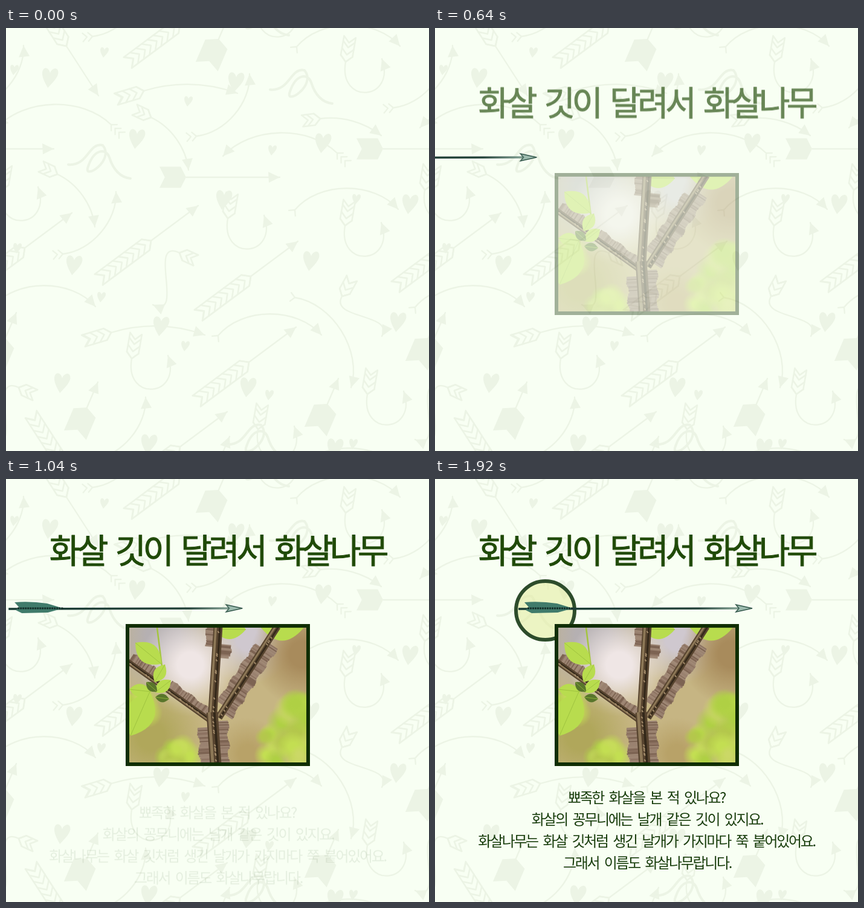
An HTML page with a canvas for the animation above (3.92 s loop, 700 by 700 pixels).

```html
<!DOCTYPE html>
<html lang="ko">
<head>
<meta charset="utf-8">
<title>화살나무</title>
<style>
html, body { margin: 0; width: 100%; height: 100%; overflow: hidden; background: #f8fff3; }
canvas, svg { position: absolute; left: 0; top: 0; width: 700px; height: 700px; }

text {
  font-family: "Noto Sans CJK KR", "Noto Sans CJK", "Noto Sans KR", sans-serif;
  text-anchor: middle; stroke-linejoin: round;
}
#title { font-size: 56px; letter-spacing: -5.5px; word-spacing: 6.5px; fill: #204a08; stroke: #204a08; stroke-width: 1; }
#story { font-size: 24px; letter-spacing: -2.35px; word-spacing: 4.2px; fill: #183c0c; }

/* One step per 80 ms inside each moving stretch. */
#title, #story, #photo, #arrow, #ring { animation: 3920ms infinite; }
#title { animation-name: title; }
#arrow { animation-name: arrow; }
#photo { animation-name: photo; }
#story { animation-name: story; }
#ring { animation-name: ring; }
@keyframes title {
  0% { opacity: 0; transform: translateY(16px); animation-timing-function: steps(12); }
  24.489%, 100% { opacity: 1; transform: none; }
}
@keyframes arrow {
  0% { transform: translateX(-535px); animation-timing-function: step-end; }
  8.163% { transform: translateX(-535px); animation-timing-function: steps(12); }
  32.653%, 100% { transform: translateX(0); }
}
@keyframes photo {
  0% { opacity: 0; animation-timing-function: step-end; }
  10.204% { opacity: 0; animation-timing-function: steps(8); }
  26.53%, 100% { opacity: 1; }
}
@keyframes story {
  0% { opacity: 0; transform: translateY(27px); animation-timing-function: step-end; }
  24.489% { opacity: 0; transform: translateY(27px); animation-timing-function: steps(12); }
  48.979%, 100% { opacity: 1; transform: none; }
}
@keyframes ring {
  0% { opacity: 0; animation-timing-function: step-end; }
  32.653% { opacity: 0; animation-timing-function: steps(8); }
  48.979%, 100% { opacity: 1; }
}
</style>
</head>
<body>
<canvas id="pattern" width="700" height="700"></canvas>

<svg viewBox="0 0 700 700">
  <linearGradient id="shaft" gradientUnits="userSpaceOnUse" x1="140" x2="510" y1="0" y2="0">
    <stop stop-color="#183a33"/><stop offset=".8" stop-color="#28463e"/><stop offset="1" stop-color="#8fae9f"/>
  </linearGradient>
  <circle id="ring" cx="182.5" cy="217.5" r="48.5" fill="#e4eda0" fill-opacity=".58" stroke="#2d4c2b" stroke-width="6"/>
  <g id="arrow">
    <path d="M138 215L505 214" stroke="url(#shaft)" stroke-width="3.6"/>
    <path d="M148 204Q175 202 202 206L228 214 203 221 160 222 150 217 155 212Z" fill="#407b6b"/>
    <path d="M153 214H228" stroke="#132d28" stroke-width="3" stroke-dasharray="3 1"/>
    <path d="M525 214L498 208 503 214 498 220Z" fill="#9dbcaf" stroke="#35594d" stroke-width="1.5"/>
  </g>
</svg>

<canvas id="photo" width="700" height="700"></canvas>

<svg viewBox="0 0 700 700">
  <text id="title" x="350" y="139">화살 깃이 달려서 화살나무</text>
  <g id="story">
    <text x="350" y="536">뾰족한 화살을 본 적 있나요?</text>
    <text x="351" y="572">화살의 꽁무니에는 날개 같은 깃이 있지요.</text>
    <text x="350" y="608">화살나무는 화살 깃처럼 생긴 날개가 가지마다 쭉 붙어있어요.</text>
    <text x="351" y="644">그래서 이름도 화살나무랍니다.</text>
  </g>
</svg>

<script>
const SIZE = 700;
let seed = 11;
const random = () => (seed = seed * 16807 % 2147483647) / 2147483647;
const context = id => document.getElementById(id).getContext('2d');

function drawPattern() {
  const g = context('pattern');
  g.fillStyle = g.strokeStyle = '#ecf4e5';
  g.lineCap = g.lineJoin = 'round';

  function at(x, y, angle, draw) {
    g.save();
    g.translate(x, y);
    g.rotate(angle);
    draw();
    g.restore();
  }

  function polyline(...points) {
    g.beginPath();
    points.forEach(([x, y]) => g.lineTo(x, y));
  }

  // Tails point backwards from the origin.
  const tails = {
    feather(size) {
      const half = 9 + size / 50;
      g.lineWidth = 2.6;
      polyline([0, 0], [-half, -half], [-size, -half], [half - size, 0], [-size, half], [-half, half]);
      g.closePath();
      g.stroke();
      for (let x = 0; x > half - size; x -= 12) {
        polyline([x - half, -half], [x, 0], [x - half, half]);
        g.stroke();
      }
    },
    barbs(size) {
      for (let x = 0; x >= -size; x -= 9) {
        polyline([x - 7, -7], [x, 0], [x - 7, 7]);
        g.stroke();
      }
    },
    block(size) {
      const half = size * .4;
      polyline([0, 0], [-half / 2, -half], [-size, -half], [half / 2 - size, 0], [-size, half], [-half / 2, half]);
      g.fill();
    }
  };

  // A shaft bowed sideways; a twist of -1 turns the bow into an S.
  function arrow(x1, y1, x2, y2, bow, tail, size, twist = 1) {
    const dx = x2 - x1, dy = y2 - y1, length = Math.hypot(dx, dy);
    const k = .4 - .6 * Math.abs(bow) / length;
    const nx = -dy / length * bow, ny = dx / length * bow;
    const ax = x1 + dx * k + nx, ay = y1 + dy * k + ny;
    const bx = x2 - dx * k + nx * twist, by = y2 - dy * k + ny * twist;
    g.lineWidth = 2.3;
    g.beginPath();
    g.moveTo(x1, y1);
    g.bezierCurveTo(ax, ay, bx, by, x2, y2);
    g.stroke();
    at(x1, y1, Math.atan2(ay - y1, ax - x1), () => tails[tail](size));
    at(x2, y2, Math.atan2(y2 - by, x2 - bx), () => {
      polyline([0, 0], [-19, -9], [-18, 9]);
      g.fill();
    });
  }

  function ribbon() {
    g.lineWidth = 4;
    g.stroke(new Path2D('M437 102C470 105 470 65 494 70C515 95 460 130 470 105C480 75 500 75 505 90Q515 122 540 125'));
  }

  const heartShape = new Path2D('M-4 18C-10 8-16-4-13-12C-10-20-2-17 0-8C3-16 12-19 14-11C16-2 5 8-4 18Z');
  function hearts(count, x, y, dx, dy, scale) {
    for (let i = 0; i < count; i++) {
      at((x + i * dx) % SIZE, (y + i * dy) % SIZE, 0, () => {
        g.scale(scale, scale);
        g.fill(heartShape);
      });
    }
  }

  // Draws once in place and once per shift, wrapping round the stage edges.
  function repeat(draw, ...shifts) {
    for (const [dx, dy] of [[0, 0], ...shifts])
      for (const wrapX of [-SIZE, 0, SIZE])
        for (const wrapY of [-SIZE, 0, SIZE])
          at(dx + wrapX, dy + wrapY, 0, draw);
  }

  const echo = [-374, -47];
  repeat(() => arrow(367, 315, 427, 310, 71, 'feather', 42), echo, [194, 12], [195, -259], [50, 349], [231, 291], [-159, 232]);
  repeat(() => arrow(405, 411, 483, 353, 0, 'feather', 108), echo, [-165, -59], [-3, 142], [-117, 282]);
  repeat(() => arrow(100, 30, 153, 112, 0, 'feather', 108));
  repeat(() => arrow(548, 207, 359, 212, 48, 'barbs', 18), echo);
  repeat(() => arrow(351, 509, 522, 508, -47, 'barbs', 0), echo, [127, -208], [130, -478]);
  repeat(() => arrow(228, 104, 383, 108, -17, 'feather', 48), [-54, 400]);
  repeat(() => arrow(240, 148, 302, 235, -18, 'feather', 30), [-155, 94]);
  repeat(() => arrow(520, 150, 621, 178, -14, 'feather', 30));
  repeat(() => arrow(315, 179, 403, 76, 33, 'barbs', 9), echo, [-221, 195], [-172, -165]);
  repeat(() => arrow(298, 247, 453, 247, 0, 'block', 44), echo);
  repeat(() => arrow(287, 372, 243, 458, 60, 'feather', 30, -1), [-266, 223]);
  repeat(() => arrow(556, 444, 622, 510, 42, 'feather', 34, -1));
  repeat(() => arrow(478, 446, 571, 595, -48, 'barbs', 0));
  repeat(() => arrow(134, 628, 152, 586, 0, 'block', 50), [398, -6], [218, -610], [-135, -115]);
  repeat(ribbon, [-334, 124], [-72, -113]);
  hearts(14, 73, 82, 144, 101, .95);
  hearts(10, 163, 40, 139, 81, .5);
}

function drawPhoto() {
  const g = context('photo');
  const pick = list => list[Math.floor(random() * list.length)];
  const greens = ['#c3de52', '#afd044', '#cbd866', '#b4c74c'];
  const barks = ['#8d7362', '#9a8270', '#7d6453', '#a08976'];

  function glow(x, y, radius, color) {
    const fade = g.createRadialGradient(x, y, radius * .25, x, y, radius);
    fade.addColorStop(0, color);
    fade.addColorStop(1, color + '00');
    g.fillStyle = fade;
    g.fillRect(x - radius, y - radius, radius * 2, radius * 2);
  }

  function foliage(x, y, spread, count) {
    for (let i = 0; i < count; i++) {
      const angle = random() * 2 * Math.PI, reach = spread * Math.sqrt(random());
      glow(x + Math.cos(angle) * reach, y + Math.sin(angle) * reach, 14 + random() * 14, pick(greens));
    }
  }

  function line(x1, y1, x2, y2, width, color) {
    g.lineWidth = width;
    g.strokeStyle = color;
    g.beginPath();
    g.moveTo(x1, y1);
    g.lineTo(x2, y2);
    g.stroke();
  }

  // Cross strokes of uneven length give a wing its grain and ragged rim.
  function wing(x1, y1, x2, y2, depth) {
    const dx = x2 - x1, dy = y2 - y1, length = Math.hypot(dx, dy);
    for (let s = 0; s < length; s += 2) {
      const x = x1 + dx * s / length, y = y1 + dy * s / length;
      const reach = depth * (.88 + .08 * Math.sin(s / 5) + .08 * random());
      line(x, y, x - dy / length * reach, y + dx / length * reach, 3, pick(barks));
    }
  }

  function branch(x1, y1, x2, y2, width) {
    line(x1, y1, x2, y2, width, '#57442f');
    line(x1 - width * .25, y1, x2 - width * .25, y2, width * .25, '#8d7857');
    line(x1 + width * .2, y1, x2 + width * .2, y2, width * .2, '#33281a');
    for (let i = 0; i < 12; i++) {
      const t = random(), x = x1 + (x2 - x1) * t, y = y1 + (y2 - y1) * t;
      line(x, y, x + 2, y + 3, 2, '#a58d6c');
    }
  }

  function leaf(x1, y1, x2, y2, color = '#b8dc4e') {
    const mx = (x1 + x2) / 2, my = (y1 + y2) / 2, wx = (y2 - y1) * .6, wy = (x1 - x2) * .6;
    g.fillStyle = color;
    g.beginPath();
    g.moveTo(x1, y1);
    g.quadraticCurveTo(mx + wx, my + wy, x2, y2);
    g.quadraticCurveTo(mx - wx, my - wy, x1, y1);
    g.fill();
    line(x1, y1, x2, y2, .8, '#98bd3c');
  }

  g.save();
  g.beginPath();
  g.rect(204, 246, 293, 223);
  g.clip();
  g.fillStyle = '#c6b583';
  g.fillRect(204, 246, 293, 223);

  glow(260, 260, 110, '#b5b0b2');
  glow(400, 265, 75, '#cfc8cf');
  glow(305, 308, 85, '#efe6e5');
  glow(490, 290, 85, '#a88b5c');
  glow(240, 425, 90, '#b0a75b');
  glow(400, 455, 60, '#b8a268');
  foliage(465, 440, 42, 22);
  foliage(480, 385, 22, 8);
  foliage(285, 460, 26, 12);
  foliage(215, 385, 22, 10);
  leaf(342, 248, 397, 249);
  leaf(422, 246, 492, 247);

  wing(204, 303, 246, 331, -17);
  wing(268, 346, 332, 394, -15);
  wing(425, 282, 362, 377, 17);
  wing(433, 272, 358, 386, -20);
  wing(349, 247, 346, 278, 18);
  wing(349, 274, 347, 294, -25);
  wing(340, 412, 343, 469, 24);
  wing(345, 402, 347, 469, -24);
  branch(200, 301, 337, 399, 9);
  branch(449, 244, 352, 395, 12);
  branch(351, 244, 341, 402, 15);
  branch(341, 386, 347, 472, 19);

  line(250, 246, 258, 310, 2.5, '#a3c53e');
  leaf(257, 306, 214, 271);
  leaf(246, 336, 263, 307);
  leaf(247, 353, 273, 333);
  leaf(240, 352, 204, 348);
  leaf(238, 352, 206, 425);
  leaf(232, 336, 250, 352, '#58752b');
  leaf(247, 361, 270, 364, '#58752b');
  g.restore();

  g.lineWidth = 6;
  g.strokeStyle = '#102e04';
  g.strokeRect(201, 243, 299, 229);
}

drawPattern();
drawPhoto();
</script>
</body>
</html>
```
